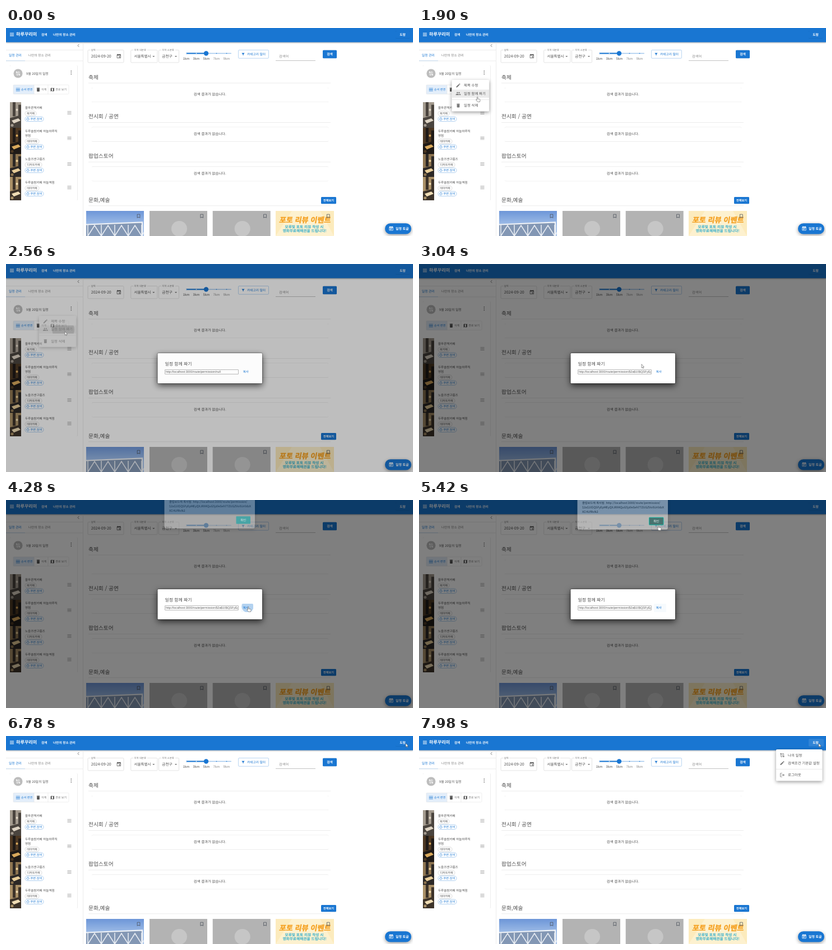
An HTML page for the animation above (8000 ms loop, 726x373 px).

```html
<!DOCTYPE html>
<html lang="ko">
<head>
<meta charset="utf-8">
<style>
html, body { margin: 0; width: 726px; height: 373px; overflow: hidden; background: #fff }
svg { display: block; font-family: "Noto Sans CJK KR", "Noto Sans", sans-serif; text-rendering: geometricPrecision }
.bar { filter: drop-shadow(0 1px 1.2px #0005) }
.soft { filter: drop-shadow(0 .7px .4px #0004) }
.pop { filter: drop-shadow(0 2px 3px #0006) }
.deep { filter: drop-shadow(0 0 .8px #000b) drop-shadow(0 4px 6px #000a) }
.latin { font-family: "Liberation Sans", Arial, sans-serif }
</style>
</head>
<body>
<svg id="stage" width="726" height="373" viewBox="0 0 726 373"></svg>
<script>
const BLUE = '#1976d2', DARK = '#505050', GRAY = '#7a7a7a';
const ICON = {
  edit: 'M3 17.2V21h3.8L17.8 9.9l-3.7-3.7zM20.7 7a1 1 0 0 0 0-1.4l-2.3-2.3a1 1 0 0 0-1.4 0l-1.9 1.8 3.8 3.8z',
  trash: 'M6 19a2 2 0 0 0 2 2h8a2 2 0 0 0 2-2V7H6zM19 4h-3.5l-1-1h-5l-1 1H5v2h14z',
  group: 'M16 11a3 3 0 1 0 0-6 3 3 0 0 0 0 6zM8 11a3 3 0 1 0 0-6 3 3 0 0 0 0 6zM8 13c-2.3 0-7 1.2-7 3.5V19h14v-2.5C15 14.2 10.3 13 8 13zM16 13h-1c1.2.9 2 2 2 3.5V19h6v-2.5c0-2.3-4.7-3.5-7-3.5z',
  calendar: 'M19 3h-1V1h-2v2H8V1H6v2H5a2 2 0 0 0-2 2v14a2 2 0 0 0 2 2h14a2 2 0 0 0 2-2V5a2 2 0 0 0-2-2zm0 16H5V8h14zM17 12h-5v5h5z',
  event: 'M19 3h-1V1h-2v2H8V1H6v2H5a2 2 0 0 0-2 2v14a2 2 0 0 0 2 2h14a2 2 0 0 0 2-2V5a2 2 0 0 0-2-2zm0 16H5V8h14zM7 10h10v2H7zM7 14h7v2H7z',
  bookmark: 'M17 3H7a2 2 0 0 0-2 2v16l7-3 7 3V5a2 2 0 0 0-2-2zm0 15-5-2.2L7 18V5h10z',
  filter: 'M3 4h18l-7 9v7l-4-2v-5z',
  map: 'M21 3 15 5 9 3 3 5v16l6-2 6 2 6-2zM15 19l-6-2V5l6 2z',
  route: 'M19 15.2V7a4 4 0 0 0-8 0v10a2 2 0 0 1-4 0V8.8a3 3 0 1 0-2 0V17a4 4 0 0 0 8 0V7a2 2 0 0 1 4 0v8.2a3 3 0 1 0 2 0z',
  logout: 'M17 7l-1.4 1.4 2.6 2.6H8v2h10.2l-2.6 2.6L17 17l5-5zM4 5h8V3H4a2 2 0 0 0-2 2v14a2 2 0 0 0 2 2h8v-2H4z',
  list: 'M2 4h20v2.6H2zM2 10.7h20v2.6H2zM2 17.4h20V20H2z',
  locate: 'M12 4a8 8 0 1 0 0 16 8 8 0 0 0 0-16zm0 2a6 6 0 1 1 0 12 6 6 0 0 1 0-12zM11 0h2v5h-2zM11 19h2v5h-2zM0 11h5v2H0zM19 11h5v2h-5z'
};

// Markup helpers: left, top, right, bottom for boxes; baseline for text; centre for icons.
const text = (x, y, size, str, fill = DARK, more = '') =>
  `<text x="${x}" y="${y}" font-size="${size}" fill="${fill}" ${more}>${str}</text>`;
const MID = 'text-anchor="middle"', BOLD = 'font-weight="700"';
const box = (l, t, r, b, fill, more = '') =>
  `<rect x="${l}" y="${t}" width="${r - l}" height="${b - t}" fill="${fill}" ${more}/>`;
const outline = (l, t, r, b, color, radius = 1.5) =>
  box(l, t, r, b, 'none', `stroke="${color}" stroke-width=".6" rx="${radius}"`);
const path = (d, color, width = .7) => `<path d="${d}" fill="none" stroke="${color}" stroke-width="${width}"/>`;
const shape = (d, fill) => `<path d="${d}" fill="${fill}"/>`;
const dot = (x, y, r, fill, more = '') => `<circle cx="${x}" cy="${y}" r="${r}" fill="${fill}" ${more}/>`;
const icon = (name, x, y, size, fill = GRAY) =>
  `<path d="${ICON[name]}" fill="${fill}" fill-rule="evenodd" transform="translate(${x - size / 2} ${y - size / 2}) scale(${size / 24})"/>`;

function header() {
  return box(0, 0, 726, 25.5, BLUE, 'class="bar"') + icon('list', 10.5, 11.7, 8.5, '#fff')
    + text(18, 14.4, 8.1, '하루꾸리미', '#fff', BOLD)
    + text(63, 13.6, 5.7, '검색', '#fff', BOLD) + text(84, 13.6, 5.7, '나만의 장소 관리', '#fff', BOLD)
    + box(695, 5, 720, 18.5, BLUE, 'rx="1.5" class="soft"') + text(707.5, 13.8, 5.7, '도람', '#fff', BOLD + MID);
}

function place([y, lines, kind, chipWidth]) {
  const top = y + 6 + (lines.length - 1) * 8;
  return lines.map((line, i) => text(34, y + 2 + i * 8, 5.55, line)).join('')
    + outline(34, top + .5, 34 + chipWidth, top + 9, '#c4c4c4', 4.2) + text(34 + chipWidth / 2, top + 6.8, 5, kind, DARK, MID)
    + outline(34, top + 10.5, 67, top + 19, '#7fb2e6', 4.2) + icon('locate', 39, top + 14.8, 6.4, BLUE)
    + text(43.5, top + 16.8, 5.2, '주변 검색', BLUE)
    + icon('list', 113, lines.length > 1 ? y + 13 : y + 9.5, 8.5, '#999');
}

// A café interior: wall, dark pillar, lit table and floor.
function photo(top, bottom, wall, shade, glow) {
  const h = bottom - top, at = p => top + h * p;
  return box(7, top, 27, bottom, wall) + box(12, top, 17, at(.55), shade) + box(22, at(.1), 27, at(.6), shade)
    + shape(`M7 ${at(.62)}L27 ${at(.5)}V${bottom}H7z`, shade)
    + shape(`M10 ${at(.72)}l12-4 4 4-12 5z`, glow) + dot(19.5, at(.3), 2, glow) + dot(11, at(.9), 2.5, wall);
}

function sidebar() {
  const places = [
    [142.5, ['물푸른책카페'], '북카페', 20],
    [184.5, ['두루솔참카페 하늘마루직', '영점'], '테마카페', 25],
    [234.5, ['노을즈앤구름즈'], '디저트카페', 30],
    [276.5, ['두루솔참카페 하늘역점'], '테마카페', 25]
  ];
  return path('M137.5 26V373M0 39.5H137M0 59H137', '#e4e4e4') + path('M130.3 29 128 31.5l2.3 2.5', DARK)
    + text(5, 51, 5.8, '일정 관리', BLUE) + text(40, 51, 5.7, '나만의 장소 관리', GRAY) + box(0, 58.4, 34, 59.2, '#b8d3ee')
    + box(7, 67, 127.5, 309, '#fff', 'rx="1.5" class="soft"')
    + dot(21.5, 81.5, 8, '#bdbdbd') + icon('route', 21.5, 81.5, 9.5, '#fff')
    + text(36, 83.6, 5.8, '9월 20일의 일정')
    + [77.2, 80, 82.8].map(y => dot(116.3, y, .85, GRAY)).join('')
    + box(13, 102, 50, 118.5, '#e3eefa') + outline(13, 102, 112, 118.5, '#e4e4e4') + path('M50 102v16.5M75 102v16.5', '#e4e4e4')
    + icon('list', 21.3, 110.5, 8.5, BLUE) + text(27, 112.4, 5.1, '순서 변경', BLUE)
    + icon('trash', 57.5, 110.5, 9.5, '#555') + text(63, 112.4, 5.1, '삭제', GRAY)
    + icon('map', 82.8, 110.5, 8.5, '#555') + text(88, 112.4, 5.1, '경로 보기', GRAY)
    + photo(133, 179, '#a39a8e', '#4a443e', '#ddd3c3') + photo(179, 226, '#4d3823', '#1f1a17', '#d9a95c')
    + photo(226, 267, '#8d7450', '#2c2826', '#e8cd98') + photo(267, 309, '#a98f66', '#3d3329', '#efdcb4')
    + places.map(place).join('');
}

function filters() {
  const field = (l, r, label, labelEnd, value, size) => outline(l, 39.5, r, 62, '#d0d0d0')
    + box(l + 4.5, 38, labelEnd, 41, '#fff') + text(l + 5.8, 41, 4.4, label, GRAY) + text(l + 5.8, 53.3, size, value);
  const arrow = x => shape(`M${x - 2} 50h4l-2 2.2z`, GRAY);
  const km = [1, 3, 5, 7, 9].map((n, i) => dot(321.5 + i * 18, 45.5, .8, i < 3 ? '#fff' : BLUE)
    + text(321.5 + i * 18, 57.2, 5.8, n + 'km', i < 3 ? DARK : '#8a8a8a', MID)).join('');
  return field(146, 210, '날짜', 161, '2024-09-20', 7) + icon('calendar', 201.3, 50.8, 9.5, '#555')
    + field(222.7, 270, '지역 대분류', 252, '서울특별시', 6.5) + arrow(263.3)
    + field(272.5, 308.5, '지역 소분류', 302, '금천구', 6.7) + arrow(303)
    + box(321, 44.8, 402, 46.3, '#a3c8ed', 'rx=".7"') + box(321, 44.6, 357, 46.5, BLUE, 'rx=".7"') + km + dot(357, 45.5, 4.2, BLUE)
    + outline(414.5, 39.5, 468.5, 54.3, '#8dbbe9') + icon('filter', 423, 47, 7, BLUE) + text(430, 49, 5.7, '카테고리 필터', BLUE)
    + text(487, 52.5, 6.2, '검색어', '#8a8a8a') + path('M481 58.5h71', '#aaa')
    + box(565, 39.7, 590, 54.3, BLUE, 'rx="1.5" class="soft"') + text(577.5, 49.1, 5.8, '검색', '#fff', BOLD + MID);
}

function results() {
  const sections = ['축제', '전시회 / 공연', '팝업스토어'].map((title, i) => {
    const y = i * 70.8;
    return text(147, 91.6 + y, 9.7, title) + path(`M147 ${98.7 + y}H579`, '#e4e4e4')
      + box(153, 107 + y, 575, 132.7 + y, '#fff', 'rx="1.5" class="soft"')
      + text(363.8, 121 + y, 6.35, '검색 결과가 없습니다.', DARK, MID);
  }).join('');
  const braces = [...Array(5)].map((_, i) => `M${146 + i * 24} 353v20l12-19 12 19`).join('');
  const mascot = x => box(x, 328, x + 103, 373, '#b3b3b3') + dot(x + 53, 360, 14, '#c6c6c6');
  return sections + text(147, 312.4, 9.7, '문화,예술') + path('M147 318.7H579', '#e4e4e4')
    + box(562, 303, 589, 315.2, BLUE, 'rx="1.5" class="soft"') + text(575.5, 311, 5.2, '전체보기', '#fff', BOLD + MID)
    + box(143, 328, 246, 373, 'url(#sky)')
    + `<g clip-path="url(#skyArea)">${shape('M143 352l100-4v25H143z', '#8397b4')}${path(braces, '#e6ebf2', 1.6)}
      ${path('M143 352.5l100-4v25', '#f0f3f7', 2.2)}</g>`
    + mascot(256) + mascot(368.7)
    + box(481, 328, 585, 373, '#fcebbd') + shape('M510 328h50l25 45h-104z', '#fdf1cf')
    + text(533.5, 349.4, 13.1, '포토 리뷰 이벤트', '#f5a224',
      MID + ' stroke="#f5a224" stroke-width=".4" font-weight="900" transform="translate(61 0) skewX(-10)"')
    + text(532, 359, 6.7, '모루빛 포토 리뷰 작성 시', '#34aecb', BOLD + MID)
    + text(532.5, 366, 6.7, '영화무료예매권을 드립니다!', '#34aecb', BOLD + MID)
    + [236.5, 349.3, 462, 574.8].map(x => icon('bookmark', x, 337.3, 9.5, '#4c535d')).join('')
    + box(676, 350.3, 723, 369.5, BLUE, 'rx="9.6" class="pop"') + icon('event', 687, 359.8, 9.5, '#fff')
    + text(695, 362, 5.9, '일정 토글', '#fff', BOLD);
}

const menuItem = (x, y, name, label) => icon(name, x, y, 9.5) + text(x + 10, y + 2.3, 6.4, label);
const menu = (id, l, t, r, b, items) => `<g id="${id}">${box(l, t, r, b, '#fff', 'rx="1.5" class="pop"')}${items}</g>`;
const url = 'http://localhost:3000/route/permission/';
const HAND = 'M0 .8C0-.3 1.5-.3 1.5.8V3.6l3 .6c.9.2 1.2.7 1 1.6L5 8.9H1L-1.7 5.6c-.4-.7.4-1.3 1-.8L0 5.4z';
const ARROW = 'M0 0v6.6l1.5-1.3 1 2.2 1-.5-1-2.1h2z';

document.getElementById('stage').innerHTML = `<defs>
  <linearGradient id="sky" x2="0" y2="1"><stop stop-color="#6d96d8"/><stop offset=".6" stop-color="#a3c0e8"/></linearGradient>
  <clipPath id="skyArea"><rect x="143" y="328" width="103" height="45"/></clipPath>
  <clipPath id="rowArea"><rect x="58.5" y="110.5" width="66.5" height="14.5"/></clipPath>
  <clipPath id="copyArea"><rect x="419" y="186" width="22" height="15" rx="1.5"/></clipPath>
  <clipPath id="userArea"><rect x="695" y="5" width="27" height="14" rx="1.5"/></clipPath>
  <clipPath id="urlArea"><rect x="284" y="189" width="129.5" height="9"/></clipPath></defs>`
  + header() + sidebar() + filters() + results()
  + dot(116.3, 80, 5, '#000', 'id="dotsRipple"')
  + menu('planMenu', 58.5, 93, 125, 149.5, box(58.5, 110.5, 125, 125, '#ebebeb', 'id="hoverRow"')
    + `<g clip-path="url(#rowArea)">${dot(102, 118, 1, '#000', 'id="rowRipple"')}</g>`
    + menuItem(70, 103, 'edit', '제목 수정') + menuItem(70, 117.5, 'group', '일정 함께 짜기')
    + path('M58.5 128.5H125', '#e0e0e0') + menuItem(70, 139, 'trash', '일정 삭제'))
  + box(0, 0, 726, 373, '#000', 'id="dim"')
  + `<g id="dialog">${box(270.5, 160, 457, 214, '#fff', 'rx="1.5" class="deep"')}
    ${text(283.5, 182.3, 7.9, '일정 함께 짜기')}${outline(283.5, 189.5, 414.5, 197.5, '#8a8a8a', .5)}
    <g clip-path="url(#urlArea)">${text(285, 195.4, 5.3, '', DARK, 'id="link" class="latin"')}</g>
    ${box(419, 186, 441, 201, BLUE, 'id="copyHover" rx="1.5"')}
    <g clip-path="url(#copyArea)">${dot(431, 191, 1, BLUE, 'id="copyRipple"')}</g>${text(422.7, 195.2, 5.6, '복사', BLUE)}</g>
  <g id="alert"><g id="alertBody">${box(282.5, -8, 444, 53, '#f4f4f4', 'rx="3.5" class="pop"')}
    ${text(291, 7.2, 5.2, '클립보드에 복사됨: ' + url, '#222')}
    ${text(291, 15.2, 5.2, '$2a$10$QSFyEpMEyQXJRXKQuG5jz9eSeh77ZUGZVoI9Jr0dzX', '#222')}
    ${text(291, 23.2, 5.2, 'XCHUfRvIk2', '#222')}</g>
    <g id="alertButton">${box(410.5, 31.3, 436, 44.7, '#2fa5a6', 'id="okFace" rx="1"')}${text(423.2, 40, 5.5, '확인', '#fff', MID)}</g></g>
  <g clip-path="url(#userArea)">${dot(711, 13, 1, '#fff', 'id="userRipple"')}</g>`
  + menu('userMenu', 637, 24, 719.5, 80.5, menuItem(648, 34.3, 'route', '나의 일정')
    + menuItem(648, 48.5, 'edit', '검색조건 기본값 설정') + path('M637 59.5h82.5', '#e0e0e0') + menuItem(648, 70, 'logout', '로그아웃'))
  + `<path id="cursor" fill="#fff" stroke="#555" stroke-width=".6" stroke-linejoin="round"/>`;

// Pointer stops: time, x, y
const STOPS = [
  [100, 716, 354], [600, 150, 39.5], [760, 117, 79], [1640, 117, 79], [1880, 103.5, 123.5],
  [2060, 103.5, 123.5], [2200, 105, 121], [2620, 105, 121], [3200, 463, 193], [3240, 463, 193],
  [3740, 431.5, 191.5], [4440, 431.5, 191.5], [4940, 428, 47], [4960, 428, 47], [5080, 426.5, 45.5],
  [5440, 426.5, 45.5], [5780, 585, 152.8], [6180, 585, 152.8], [6780, 713, 13], [8000, 713, 13]
];
const $ = Object.fromEntries([...document.querySelectorAll('#stage [id]')].map(el => [el.id, el]));
const set = (el, attrs) => { for (const name in attrs) el.setAttribute(name, attrs[name]); };

function ramp(t, from, to) {
  const p = Math.min(1, Math.max(0, (t - from) / (to - from)));
  return p * p * (3 - 2 * p);
}
function pointer(t) {
  const i = Math.max(1, STOPS.findIndex(stop => stop[0] > t));
  const [t0, x0, y0] = STOPS[i - 1], [t1, x1, y1] = STOPS[i], p = ramp(t, t0, t1);
  return [x0 + (x1 - x0) * p, y0 + (y1 - y0) * p];
}
function grow(el, x, y, open, opacity) {
  const sx = .75 + .25 * open, sy = .56 + .44 * open;
  set(el, { opacity, transform: `translate(${x} ${y}) scale(${sx} ${sy}) translate(${-x} ${-y})` });
}
function ripple(el, t, start, radius, strength) {
  set(el, { r: radius * ramp(t, start - 60, start + 300), opacity: t < start ? 0 : strength * (1 - ramp(t, start + 200, start + 560)) });
}

function draw(t) {
  const modal = t < 6020;
  ripple($.dotsRipple, t, 1380, 5, .18);
  ripple($.rowRipple, t, 2400, 30, .25);
  ripple($.copyRipple, t, 4140, 18, .3);
  ripple($.userRipple, t, 7580, 22, .25);

  const planOpen = ramp(t, 1400, 1640);
  grow($.planMenu, 117, 93, planOpen - ramp(t, 2540, 2760), planOpen * (1 - ramp(t, 2440, 2690)));
  set($.hoverRow, { opacity: +(t >= 1780) });
  const userOpen = ramp(t, 7600, 7860);
  grow($.userMenu, 708, 24, userOpen, userOpen);

  set($.dim, { opacity: modal ? .5 * ramp(t, 2440, 2680) : 0 });
  set($.dialog, { opacity: modal ? ramp(t, 2400, 2580) : 0 });
  set($.copyHover, { opacity: t > 3600 ? .04 : 0 });
  $.link.textContent = url + (t < 2640 ? 'null' : '$2a$10$QSFyEpMEyQXJRXKQuG5');

  const shown = ramp(t, 4160, 4460) * (1 - ramp(t, 5300, 5530));
  set($.alert, { transform: `translate(0 ${-3 * (1 - ramp(t, 4160, 4460))})` });
  set($.alertBody, { opacity: shown });
  set($.alertButton, { opacity: Math.min(1, shown * 2.2) });
  set($.okFace, t < 5220 ? { fill: '#2fa5a6', stroke: 'none' } : { fill: '#47736f', stroke: '#14b8a6' });

  const [x, y] = pointer(t);
  const hand = t > 720 && t < 2200 || t > 3600 && t < 4500 || t > 4920 && t < 5480;
  set($.cursor, { d: hand ? HAND : ARROW, transform: `translate(${x} ${y})`, opacity: +(t >= 100) });
}

function tick() {
  draw(performance.now() % 8000);
  requestAnimationFrame(tick);
}
tick();
</script>
</body>
</html>
```
